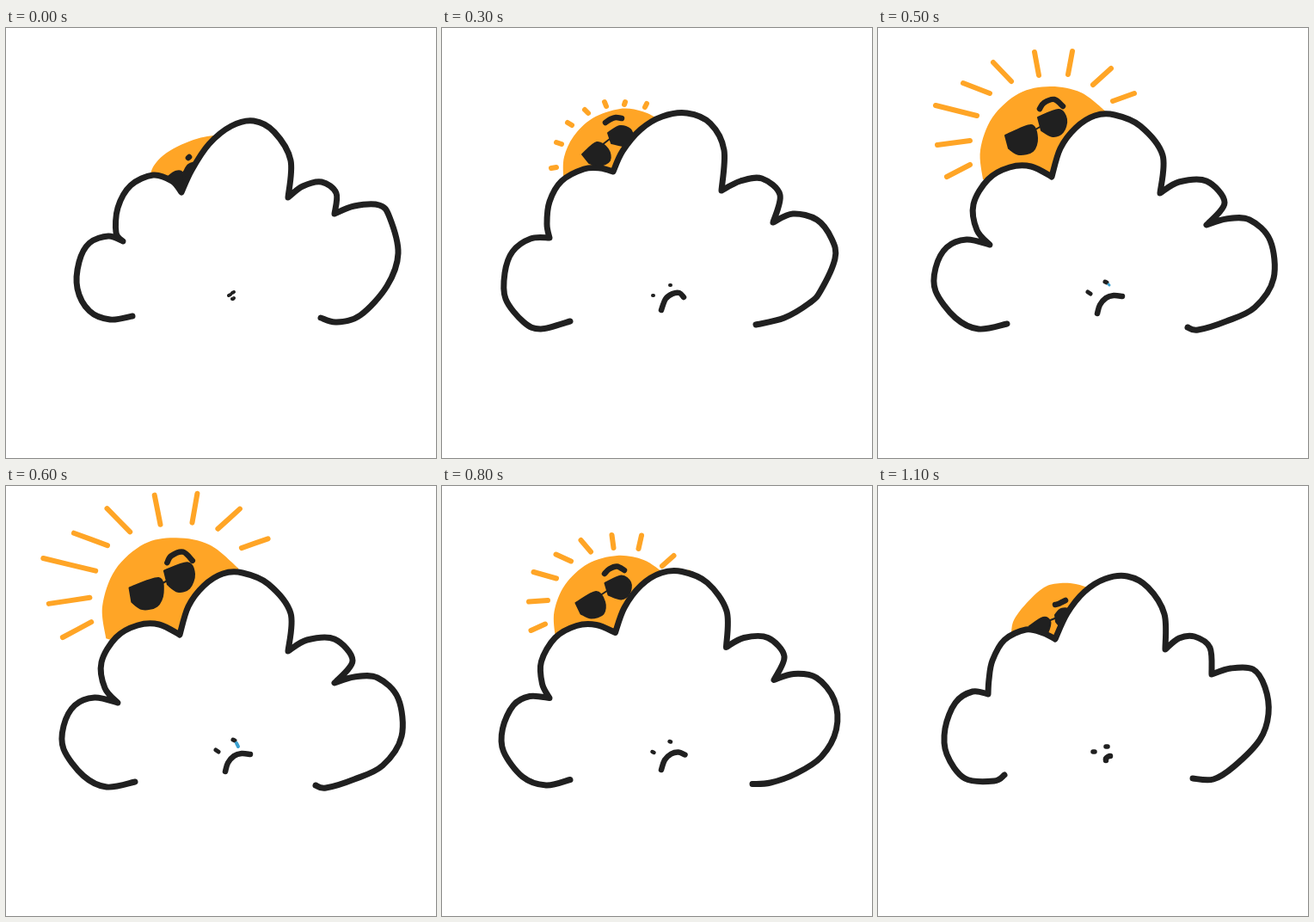
An HTML page with a canvas that plays this animation: 500x500 px, repeating every 1210 ms.

```html
<!DOCTYPE html>
<html lang="en">
<head>
<meta charset="utf-8">
<title>Sun behind a cloud</title>
<style>
html, body { margin: 0; width: 100%; height: 100%; overflow: hidden; background: #fff; }
canvas { display: block; }
</style>
</head>
<body>
<canvas id="stage" width="500" height="500"></canvas>
<script>
const ctx = document.getElementById('stage').getContext('2d');
const INK = '#202020', ORANGE = '#ffa526', BLUE = '#3aa0d0';
const nums = text => text.match(/[\d.]+/g).map(Number);

// Each part has four poses, from hidden sun to risen sun.
const cloud = [
  `147,335 121,339 97,329 83,303 85,272 97,250 119,242 136,248
   128,238 130,209 145,183 171,171 193,178 204,191
   216,165 236,135 262,114 288,108 312,121 331,154 328,197
   345,184 367,179 384,192 382,216
   405,207 434,206 446,220 456,262 443,300 412,334 384,342 366,337`,
  `147,336 135,343 101,340 80,312 78,282 90,252 110,239 128,242
   129,225 133,203 147,179 172,167 192,171 206,178
   220,148 240,123 264,108 290,105 314,118 333,149 334,190
   350,177 368,175 386,188 388,219
   410,212 436,213 450,234 454,265 444,295 414,326 390,341 366,340`,
  `149,341 115,350 95,342 74,315 73,285 82,260 103,245 125,244
   122,228 125,202 139,178 165,164 184,163 199,167
   210,143 231,118 256,103 285,99 312,111 328,142 325,189
   347,178 372,175 393,194 385,226
   408,216 436,223 453,245 457,268 440,306 427,320 398,337 365,345`,
  `150,344 117,350 90,337 67,306 67,279 80,255 103,246 130,252
   115,235 111,205 128,176 153,162 178,161 202,173
   212,140 230,116 252,102 275,101 305,114 331,148 328,192
   350,179 382,178 403,203 382,229
   405,222 432,223 456,247 460,291 438,325 405,341 372,351 360,348`
].map(nums);

// The cloud wobbles to a different outline on the way back down.
const cloudBack = cloud.slice();
cloudBack[2] = nums(
  `148,339 125,346 97,339 76,311 74,285 86,255 101,243 120,241
   118,225 120,203 135,177 160,163 181,162 201,168
   212,143 233,115 258,100 283,98 312,111 331,143 333,183
   352,174 376,175 393,193 390,222
   413,215 439,223 456,250 457,275 444,305 418,328 392,339 362,345`);
const corners = [0, 7, 13, 20, 24, 32];

const sun = [
  '167,172 172,160 183,148 199,138 218,130 234,126 246,125',
  '155,170 158,156 172,137 193,118 212,113 230,114 246,119',
  '141,172 142,150 153,126 175,105 207,94 233,97 252,106',
  '122,176 119,142 133,104 164,76 200,68 236,75 266,98'
].map(nums);
const leftLens = [
  '187,174 197,167 205,168 206,180 203,190 196,186',
  '176,163 192,153 200,157 199,166 194,174 184,170',
  '163,147 180,133 193,141 195,154 183,160 171,157',
  '148,125 178,113 185,128 180,143 164,147 152,140'
].map(nums);
const rightLens = [
  '207,167 212,159 222,157 219,168 212,178 207,176',
  '206,150 213,143 224,144 220,155 213,163 207,158',
  '193,122 207,114 219,118 221,128 214,137 197,134',
  '186,104 210,95 219,106 215,121 203,126 190,119'
].map(nums);
const bridge = ['206,168 207,167', '198,157 208,153', '186,136 195,129', '178,121 190,114'].map(nums);
const brow = [
  '212,151 212,151 213,150 213,150',
  '206,138 210,137 214,135 218,133',
  '190,110 196,106 202,104 209,105',
  '188,94 193,87 205,83 215,91'
].map(nums);
const rays = [
  `127,163 133,162 133,133 139,135 146,110 151,113 166,95 170,99 189,86 191,91
   213,86 212,89 238,88 236,92 268,115 262,120 276,125 270,128`,
  `80,173 107,159 69,136 107,131 67,90 115,102 99,64 130,76 134,40 155,62
   182,28 187,55 226,27 221,54 271,47 250,66 298,76 273,85`
].map(nums);
const mouth = [
  '263,315 263,315 264,315 264,315 265,314',
  '265,319 265,317 267,315 269,314 270,314',
  '255,328 260,315 268,309 276,308 281,313',
  '255,332 258,322 265,314 274,311 284,312'
].map(nums);
// Two short strokes: left eye, right eye.
const eyes = [
  '259,311 261,310 263,308 265,307',
  '250,309 252,309 265,303 267,303',
  '245,311 246,311 265,299 266,299',
  '244,307 247,309 264,295 266,296'
].map(nums);
const eyeWidth = [[4], [5.5], [4], [5]];
const mouthWidth = [[4], [6.5], [6.5], [6.5]];

function mix(poses, p) {
  const i = Math.max(0, Math.min(Math.floor(p), poses.length - 2));
  return poses[i].map((v, k) => v + (poses[i + 1][k] - v) * (p - i));
}

// Adds a smooth curve through points a to b of a flat x,y list.
function curve(list, a = 0, b = list.length / 2 - 1) {
  const at = i => { i = Math.max(a, Math.min(b, i)); return [list[2 * i], list[2 * i + 1]]; };
  for (let i = a; i < b; i++) {
    const [p, q, r, s] = [at(i - 1), at(i), at(i + 1), at(i + 2)];
    ctx.bezierCurveTo(q[0] + (r[0] - p[0]) / 6, q[1] + (r[1] - p[1]) / 6,
      r[0] - (s[0] - q[0]) / 6, r[1] - (s[1] - q[1]) / 6, r[0], r[1]);
  }
}

function begin(list) {
  ctx.beginPath();
  ctx.moveTo(list[0], list[1]);
}

function stroke(width, color = INK) {
  ctx.lineWidth = width;
  ctx.strokeStyle = color;
  ctx.stroke();
}

function fill(color) {
  ctx.fillStyle = color;
  ctx.fill();
}

function line(list, width, color) {
  begin(list);
  curve(list);
  stroke(width, color);
}

function segments(list, width, color) {
  for (let i = 0; i < list.length; i += 4) line(list.slice(i, i + 4), width, color);
}

function lens(list) {
  begin(list);
  curve(list);
  ctx.closePath();
  fill(INK);
  stroke(2);
}

function drawSun(p) {
  const disc = mix(sun, p);
  begin(disc);
  curve(disc);
  ctx.lineTo(240, 180);
  ctx.lineTo(190, 200);
  fill(ORANGE);
  if (p >= 2) segments(mix(rays, p - 2), 6, ORANGE);
  line(mix(brow, p), 6.5);
  line(mix(bridge, p), 2);
  lens(mix(leftLens, p));
  lens(mix(rightLens, p));
}

function drawCloud(outline) {
  begin(outline);
  for (let i = 0; i < 5; i++) curve(outline, corners[i], corners[i + 1]);
  fill('#fff');
  stroke(7);
}

const rise = [0, 1, 1.5, 2, 2.5, 3, 3.3, 3, 2.5, 2, 1.5, 1];

function draw(now) {
  const step = Math.min(11, Math.floor(now % 1210 / 100));
  const p = rise[step], held = Math.min(p, 3);
  ctx.fillStyle = '#fff';
  ctx.fillRect(0, 0, 500, 500);
  ctx.lineCap = ctx.lineJoin = 'round';
  drawSun(p);
  drawCloud(mix(step > 7 ? cloudBack : cloud, held));
  segments(mix(eyes, held), mix(eyeWidth, held)[0]);
  line(mix(mouth, held), mix(mouthWidth, held)[0]);
  if (step === 5) line([268, 298, 269, 299], 3, BLUE);
  if (step === 6) line([268, 299, 270, 303], 4, BLUE);
  if (step === 7) line([266, 296, 270, 299], 2);
}

const start = performance.now();
function tick() {
  draw(performance.now() - start);
  requestAnimationFrame(tick);
}
tick();
</script>
</body>
</html>
```
